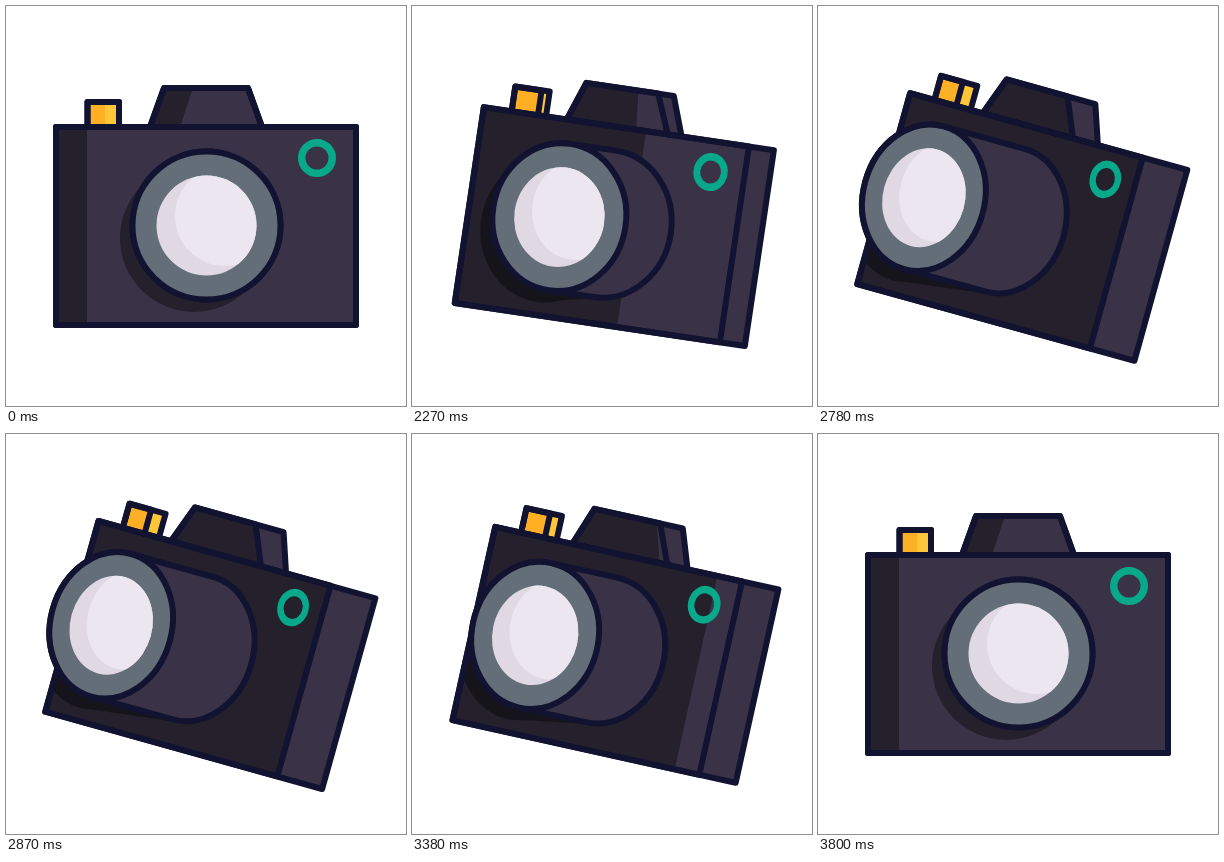
An HTML page with a canvas for the animation above (3.83 s loop, 400 px wide and 400 px high).

```html
<!DOCTYPE html>
<html>
<head>
<meta charset="utf-8">
<title>Camera</title>
<style>
html, body { margin: 0; width: 100%; height: 100%; overflow: hidden; background: #fff; }
canvas { display: block; }
</style>
</head>
<body>
<canvas id="stage" width="400" height="400"></canvas>
<script>
const ctx = document.getElementById('stage').getContext('2d');
const LOOP = 3830, START = 2000, END = 3800, STEP = 30;
const INK = '#121331', BODY = '#3a3347', SHADE = 'rgba(0,0,0,.38)';
const GREY = '#646e78', GLASS = '#ebe6ef', GLASS_DARK = '#e0d9e4';
const AMBER = '#ffaf24', YELLOW = '#ffc738', GREEN = '#08a88a';

// Cubic Bezier easing with handles (.3, 0) and (.12, 1).
function ease(u) {
  if (u <= 0) return 0;
  if (u >= 1) return 1;
  let lo = 0, hi = 1, s;
  for (let i = 0; i < 25; i++) {
    s = (lo + hi) / 2;
    const x = 3 * (1 - s) ** 2 * s * .3 + 3 * (1 - s) * s * s * .12 + s ** 3;
    if (x < u) lo = s; else hi = s;
  }
  return s * s * (3 - 2 * s);
}

function poly(...pts) {
  const path = new Path2D();
  pts.forEach(([x, y]) => path.lineTo(x, y));
  path.closePath();
  return path;
}

const box = (left, top, right, bottom) =>
  poly([left, top], [right, top], [right, bottom], [left, bottom]);

function oval(x, y, rx, ry) {
  const path = new Path2D();
  path.ellipse(x, y, rx, ry, 0, 0, 2 * Math.PI);
  return path;
}

// Outline swept by an oval from (x1, y1) on the left to (x2, y2).
function sweep(x1, y1, x2, y2, rx, ry) {
  const path = new Path2D(), q = Math.PI / 2;
  path.ellipse(x2, y2, rx, ry, 0, -q, q);
  path.ellipse(x1, y1, rx, ry, 0, q, 3 * q);
  path.closePath();
  return path;
}

function fill(path, color) {
  ctx.fillStyle = color;
  ctx.fill(path);
}

function outline(path) {
  ctx.strokeStyle = INK;
  ctx.lineWidth = 6;
  ctx.stroke(path);
}

function clipped(mask, draw) {
  ctx.save();
  ctx.clip(mask);
  draw();
  ctx.restore();
}

function drawButton(p) {
  const left = -118.5, edge = -87 - 9 * p, right = -87 + 6 * p;
  const front = box(left, -124, edge, -96), whole = box(left, -124, right, -96);
  fill(whole, YELLOW);
  clipped(front, () => fill(box(left, -124, -101 + 20 * p, -96), AMBER));
  outline(whole);
  outline(front);
}

function drawHump(p) {
  const tl = [-42 - 12.5 * p, -138], bl = [-56 - 12.5 * p, -99];
  const front = poly(tl, [42 - 33.5 * p, -138], [56 - 31 * p, -99], bl);
  const whole = poly(tl, [42 - 4.4 * p, -138], [56 - 5 * p, -99], bl);
  fill(whole, BODY);
  clipped(front, () =>
    fill(poly([-80, -138], [-13 + 31 * p, -138], [-26 + 62 * p, -99], [-80, -99]), SHADE));
  outline(whole);
  outline(front);
}

function drawBody(p, squash) {
  const half = 150 - 6.25 * p, edge = half - 46.6 * p;
  const front = box(-half, -99, edge, 99), whole = box(-half, -99, half, 99);
  fill(whole, BODY);
  clipped(front, () => {
    fill(box(-half, -99, -half + 31 + 246 * p, 99), SHADE);
    const x = -12 - 100 * p, rx = 74 * squash;
    const shadow = sweep(x, 12, -19 * p, 0, rx, 74);
    shadow.addPath(oval(x, 12, rx, 74));
    fill(shadow, SHADE);
  });
  outline(whole);
  outline(front);
}

function drawRing(p, squash) {
  ctx.save();
  ctx.translate(111 - 44 * p, -68);
  ctx.scale(squash, 1);
  ctx.strokeStyle = GREEN;
  ctx.lineWidth = 7.5;
  ctx.stroke(oval(0, 0, 15.25, 15.25));
  ctx.restore();
}

function drawLens(p, squash) {
  const x = .5 - 104 * p, y = -.5 - 1.5 * p, rx = 74 * squash;
  const tube = sweep(x, y, .5 - 19.3 * p, y, rx, 74);
  fill(tube, BODY);
  outline(tube);
  const rim = oval(x, y, rx, 74);
  fill(rim, GREY);
  outline(rim);
  const glass = oval(x, y, 50 * squash, 50);
  fill(glass, GLASS_DARK);
  clipped(glass, () => fill(oval(x + 18.5 * squash, y - 9.5, 50 * squash, 50), GLASS));
}

// Short burst of rays around the lens at the end of the turn.
function drawFlash(p, k) {
  if (k <= 0 || k >= 1) return;
  const inner = 95 + 80 * k * k, outer = 95 + 90 * Math.sqrt(k);
  ctx.strokeStyle = YELLOW;
  ctx.lineWidth = 6;
  ctx.beginPath();
  for (let i = 0; i < 8; i++) {
    const a = i * Math.PI / 4, c = Math.cos(a), s = Math.sin(a);
    ctx.moveTo(-104 * p + c * inner, s * inner);
    ctx.lineTo(-104 * p + c * outer, s * outer);
  }
  ctx.stroke();
}

function render(t) {
  const p = ease(Math.min(t - START, END - t) / 900);
  const squash = 1 - .18 * p;
  ctx.fillStyle = '#fff';
  ctx.fillRect(0, 0, 400, 400);
  ctx.save();
  ctx.lineJoin = ctx.lineCap = 'round';
  ctx.translate(200 + 4.3 * p, 220 + p);
  ctx.rotate(15.6 * p * Math.PI / 180);
  drawButton(p);
  drawHump(p);
  drawBody(p, squash);
  drawRing(p, squash);
  drawLens(p, squash);
  drawFlash(p, (t - 2880) / 190);
  ctx.restore();
}

function tick() {
  const t = performance.now() % LOOP;
  const offset = START + STEP;
  render(t < offset ? 0 : offset + Math.floor((t - offset) / STEP) * STEP);
  requestAnimationFrame(tick);
}
tick();
</script>
</body>
</html>
```
